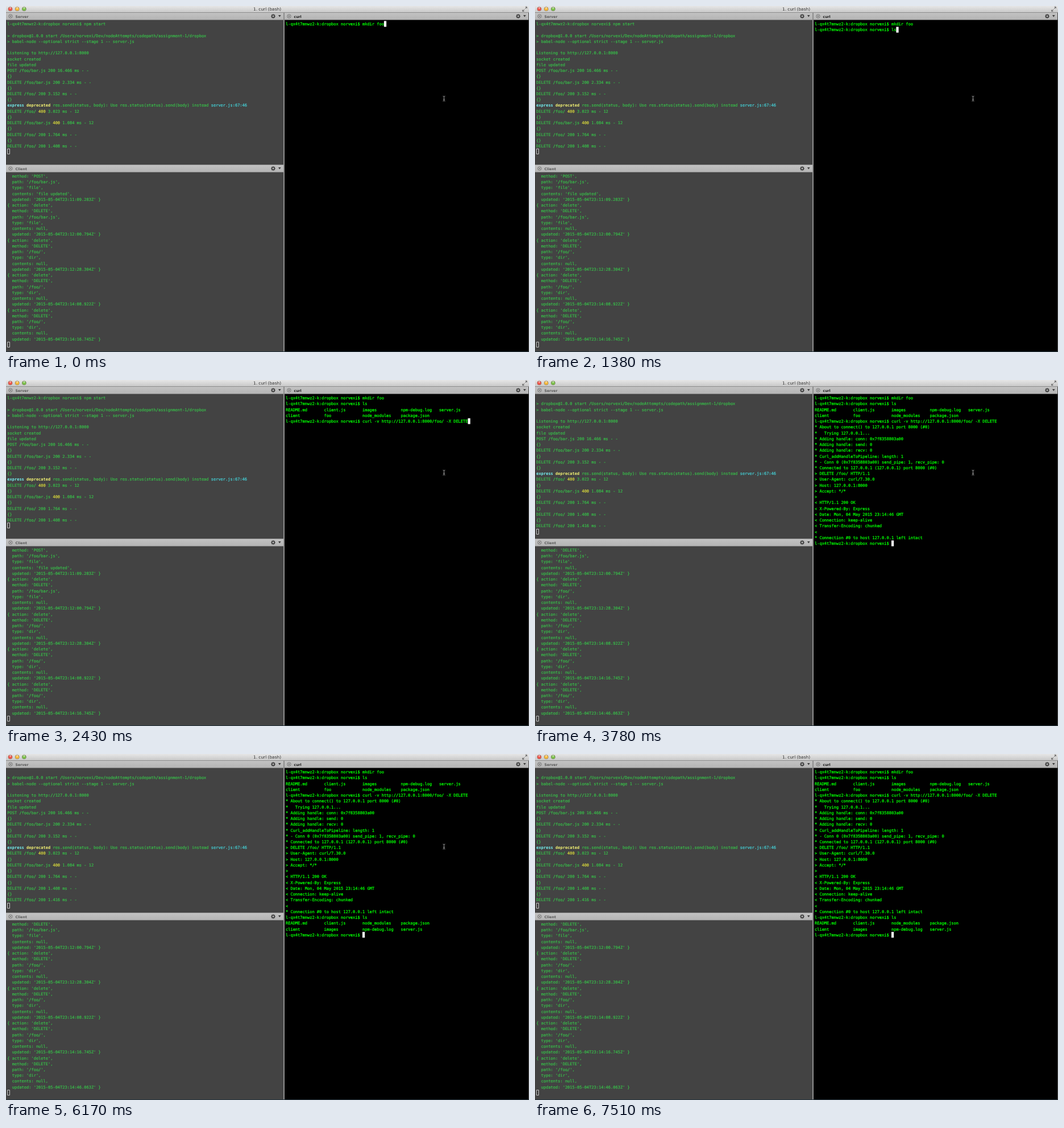
These frames come from a looping animation (920x609 px, 8.01 s). An HTML page with a canvas:

```html
<!DOCTYPE html>
<html lang="en">
<head>
<meta charset="utf-8">
<title>Terminal session</title>
<style>
  html, body { margin: 0; width: 100%; height: 100%; overflow: hidden; background: #000; }
  canvas { display: block; }
</style>
</head>
<body>
<canvas id="stage" width="920" height="609"></canvas>
<script>
const ctx = document.getElementById('stage').getContext('2d');
ctx.textRendering = 'geometricPrecision';
ctx.lineJoin = 'round';

const LOOP = 8010;
const CELL = 4.217, ROW = 10.24;
const MONO = '7px "DejaVu Sans Mono", monospace';
const GREEN = '#00f400', DIM_GREEN = '#38c04a', YELLOW = '#dcdc3c', CYAN = '#45d6dc';
const PROMPT = 'l-qx4t7mnwz2-k:dropbox norvexi$ ';

// ---- Terminal contents ----
const server = [
  PROMPT + 'npm start',
  '',
  '> dropbox@1.0.0 start /Users/norvexi/Dev/nodeAttempts/codepath/assignment-1/dropbox',
  '> babel-node --optional strict --stage 1 -- server.js',
  '',
  'Listening to http://127.0.0.1:8000',
  'socket created',
  'file updated',
  'POST /foo/bar.js 200 16.466 ms - -',
  '{}',
  'DELETE /foo/bar.js 200 2.334 ms - -',
  '{}',
  'DELETE /foo/ 200 3.152 ms - -',
  '{}',
  [['express ', '#74f4f4', true], ['deprecated ', '#f4f474', true],
   ['res.send(status, body): Use res.status(status).send(body) instead '], ['server.js:67:46', CYAN]],
  [['DELETE /foo/ '], ['400', YELLOW], [' 3.023 ms - 12']],
  '{}',
  [['DELETE /foo/bar.js '], ['400', YELLOW], [' 1.084 ms - 12']],
  '{}',
  'DELETE /foo/ 200 1.764 ms - -',
  '{}',
  'DELETE /foo/ 200 1.408 ms - -',
  '{}',
  'DELETE /foo/ 200 1.416 ms - -'
];

const event = (method, path, type, contents, time) => [
  `{ action: '${method === 'POST' ? 'update' : 'delete'}',`,
  `  method: '${method}',`,
  `  path: '${path}',`,
  `  type: '${type}',`,
  `  contents: ${contents},`,
  `  updated: '2015-05-04T23:${time}Z' }`
];
const client = [
  event('POST', '/foo/bar.js', 'file', "'file updated'", '11:09.283'),
  event('DELETE', '/foo/bar.js', 'file', 'null', '12:00.794'),
  ...['12:28.304', '14:08.922', '14:16.745', '14:46.063']
    .map(time => event('DELETE', '/foo/', 'dir', 'null', time))
].flat();

const columns = names => names.split(' ').map(n => n.padEnd(16)).join('');
const listing = ['README.md client.js images npm-debug.log server.js',
                 'client foo node_modules package.json'].map(columns);
const listingAfter = ['README.md client.js node_modules package.json',
                      'client images npm-debug.log server.js'].map(columns);
const curl = 'curl -v http://127.0.0.1:8000/foo/ -X DELETE';
const reply = `* About to connect() to 127.0.0.1 port 8000 (#0)
*   Trying 127.0.0.1...
* Adding handle: conn: 0x7f8358803a00
* Adding handle: send: 0
* Adding handle: recv: 0
* Curl_addHandleToPipeline: length: 1
* - Conn 0 (0x7f8358803a00) send_pipe: 1, recv_pipe: 0
* Connected to 127.0.0.1 (127.0.0.1) port 8000 (#0)
> DELETE /foo/ HTTP/1.1
> User-Agent: curl/7.30.0
> Host: 127.0.0.1:8000
> Accept: */*
>
< HTTP/1.1 200 OK
< X-Powered-By: Express
< Date: Mon, 04 May 2015 23:14:46 GMT
< Connection: keep-alive
< Transfer-Encoding: chunked
<
* Connection #0 to host 127.0.0.1 left intact`.split('\n');

function shellLines(t) {
  const typed = (first, second) => PROMPT + (t < first ? '' : t < second ? 'l' : 'ls');
  const lines = [PROMPT + 'mkdir foo'];
  if (t >= 450) lines.push(typed(1230, 1380));
  if (t >= 1530) lines.push(...listing, PROMPT + (t < 2280 ? '' : curl));
  if (t >= 3780) lines.push(...reply, typed(5580, 5720));
  if (t >= 6170) lines.push(...listingAfter, PROMPT);
  return lines;
}

// ---- Drawing helpers ----
function rect(x, y, w, h, fill) {
  ctx.fillStyle = fill;
  ctx.fillRect(x, y, w, h);
}

function bar(x, y, w, h, top, bottom) {
  const shade = ctx.createLinearGradient(0, y, 0, y + h);
  shade.addColorStop(0, top);
  shade.addColorStop(1, bottom);
  rect(x, y, w, h, shade);
}

function disc(x, y, r, fill) {
  ctx.fillStyle = fill;
  ctx.beginPath();
  ctx.arc(x, y, r, 0, 7);
  ctx.fill();
}

function stroke(path, color, width = 1) {
  ctx.strokeStyle = color;
  ctx.lineWidth = width;
  ctx.stroke(new Path2D(path));
}

function label(text, x, y, font, color, align = 'left') {
  ctx.font = font;
  ctx.fillStyle = color;
  ctx.textAlign = align;
  ctx.fillText(text, x, y);
}

// Terminal text sits on a fixed character grid; a thin outline adds weight.
function drawLines(lines, x, top, color, weight) {
  ctx.lineWidth = weight;
  lines.forEach((line, row) => {
    const spans = typeof line === 'string' ? [[line]] : line;
    const y = top + row * ROW + 7.7;
    let col = 0;
    for (const [text, tint = color, bold] of spans) {
      ctx.strokeStyle = tint;
      for (const ch of text) {
        const cx = x + col++ * CELL;
        if (ch === ' ') continue;
        label(ch, cx, y, (bold ? 'bold ' : '') + MONO, tint);
        if (!bold) ctx.strokeText(ch, cx, y);
      }
    }
  });
}

function hollowCursor(y) {
  ctx.strokeStyle = '#cfcfcf';
  ctx.lineWidth = 0.9;
  ctx.strokeRect(2.5, Math.round(y) + 0.5, 4, 9);
}

function paneHeader(x, y, w, name, color) {
  bar(x, y, w, 12.5, '#c2c2c2', '#b4b4b4');
  const cx = x + 8, cy = y + 6, right = x + w;
  stroke(`M${cx - 3.2} ${cy}a3.2 3.2 0 1 0 6.4 0a3.2 3.2 0 1 0 -6.4 0`, '#696969', 0.8);
  stroke(`M${cx - 1.4} ${cy - 1.4}l2.8 2.8m0 -2.8l-2.8 2.8`, '#696969', 0.8);
  label(name, x + 16.5, y + 8.6, 'bold 6.2px "DejaVu Sans", sans-serif', color);

  const gx = right - 18;
  for (let i = 0; i < 4; i++) {
    const a = i * Math.PI / 4, dx = 4 * Math.cos(a), dy = 4 * Math.sin(a);
    stroke(`M${gx - dx} ${cy - dy}L${gx + dx} ${cy + dy}`, '#3c3c3c', 1.2);
  }
  disc(gx, cy, 2.9, '#3c3c3c');
  disc(gx, cy, 1.4, '#bdbdbd');
  ctx.fillStyle = '#3c3c3c';
  ctx.fill(new Path2D(`M${right - 9} ${y + 4}h4.6l-2.3 3.6z`));
}

function titleBar() {
  bar(0, 0, 920, 12, '#e6e6e6', '#c6c6c6');
  rect(0, 11, 920, 1, '#8c8c8c');
  ['#f0564c', '#f5b93c', '#7cc04a'].forEach((fill, i) => {
    disc(7.5 + i * 12.2, 5.2, 3.8, '#77706a');
    disc(7.5 + i * 12.2, 5.2, 3.3, fill);
    disc(7.5 + i * 12.2, 3.6, 1.3, '#ffffff99');
  });
  label('1. curl (bash)', 459.5, 8.3, '7.4px "DejaVu Sans", sans-serif', '#333', 'center');
  stroke('M913.2 4.8l3 -3m-2.6 0h2.6v2.6M911.8 6.2l-3 3m2.6 0h-2.6v-2.6', '#555', 1);
}

function textPointer(x, y) {
  stroke(`M${x + 0.6} ${y + 0.6}q1.9 0 1.9 1.3q0 -1.3 1.9 -1.3`
    + `M${x + 2.5} ${y + 1.5}v7M${x + 1.2} ${y + 6.3}h2.6`
    + `M${x + 0.6} ${y + 9.4}q1.9 0 1.9 -1.3q0 1.3 1.9 1.3`, '#d0d0d0', 0.7);
}

function arrowPointer(x, y) {
  const path = `M${x} ${y}v8l1.8 -1.6l1.3 2.6l1.4 -0.7l-1.2 -2.5h2.5z`;
  ctx.fillStyle = '#000';
  ctx.fill(new Path2D(path));
  stroke(path, '#e8e8e8', 0.8);
}

// Pointer stops as [start time, x, y]
const pointerStops = [
  [0, 768, 158], [6610, 777, 201], [6760, 804, 353], [6910, 832, 526],
  [7060, 833, 534], [7210, 887, 581], [7360, 890, 593]
];

function drawPointer(t) {
  if (t >= 7510) return;
  if (t >= 1980 && t < 2430) return arrowPointer(769.6, 162);
  const [, x, y] = pointerStops.findLast(([start]) => t >= start);
  textPointer(x, y);
}

function draw(now) {
  const t = now % LOOP;
  const deleted = t >= 3780;

  rect(0, 0, 920, 609, '#000');
  rect(0, 12, 488, 597, '#434343');
  titleBar();
  paneHeader(0, 12, 488, 'Server', '#5a5a5a');
  paneHeader(0, 280, 488, 'Client', '#5a5a5a');
  paneHeader(490, 12, 429, 'curl', '#1c1c1c');
  rect(0, 279, 488, 1, '#888');
  rect(488, 12, 2, 596, '#8e8e8e');
  rect(919, 12, 1, 596, '#4c4c4c');
  rect(0, 608, 920, 1, '#26353d');

  const log = deleted ? server.slice(1) : server.slice(0, 22);
  drawLines(log, 2.3, 26.4, DIM_GREEN, 0.2);
  hollowCursor(26 + log.length * ROW);

  const first = deleted ? 7 : 1;
  drawLines(client.slice(first, first + 29), 2.3, 294.3, DIM_GREEN, 0.2);
  hollowCursor(294 + 29 * ROW);

  const shell = shellLines(t);
  drawLines(shell, 492, 26.4, GREEN, 0.3);
  const row = shell.length - 1;
  rect(492 + shell[row].length * CELL, 26.4 + row * ROW, CELL, 10.2, '#fff');

  drawPointer(t);
}

let start;
function tick(now) {
  start ??= now;
  draw(now - start);
  requestAnimationFrame(tick);
}
requestAnimationFrame(tick);
</script>
</body>
</html>
```
